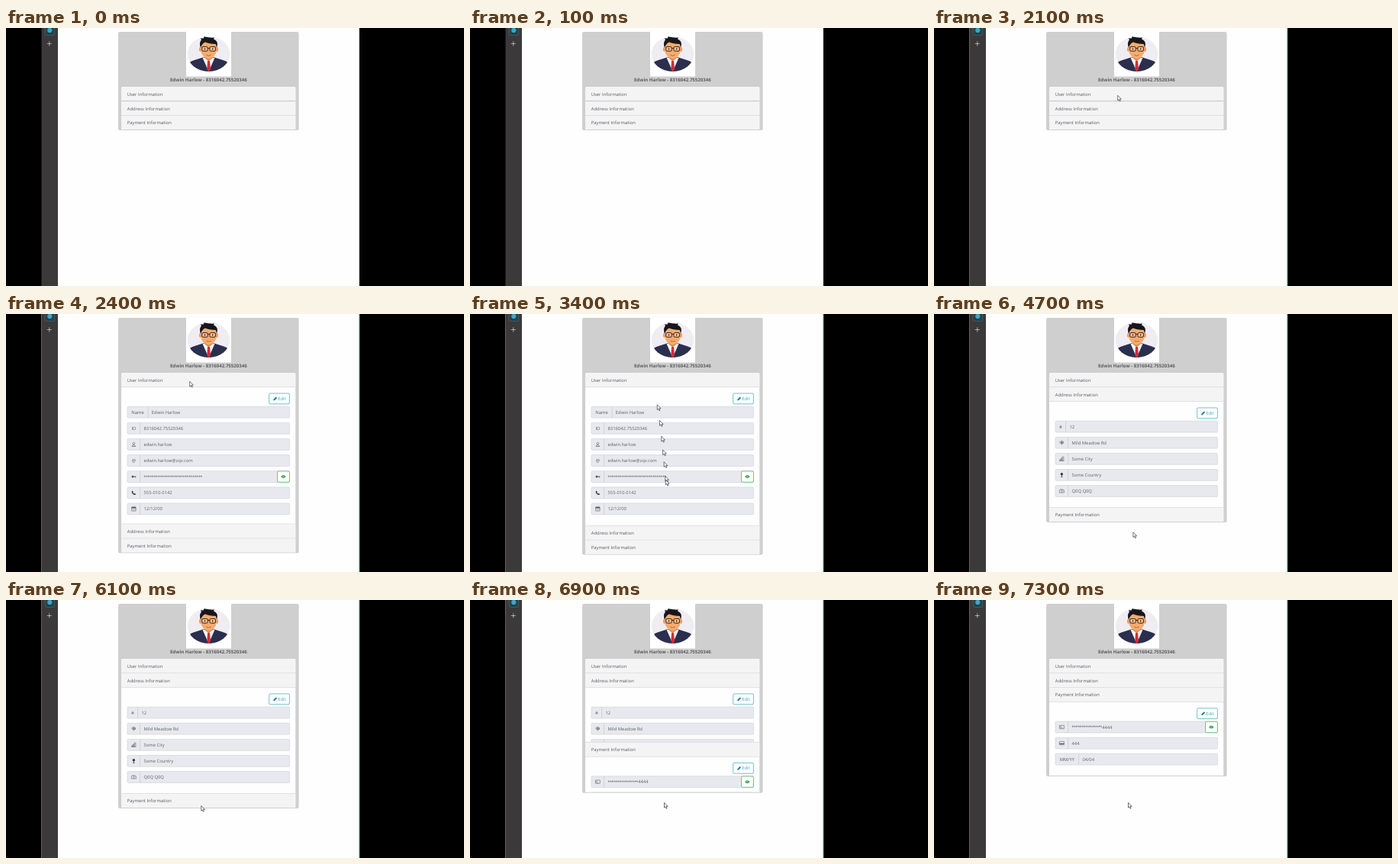
Recreate the animation shown at these times as an HTML page with a canvas. Size 600 px wide and 338 px high, loop 8 s.

```html
<!DOCTYPE html>
<html lang="en">
<head>
<meta charset="utf-8">
<title>Profile accordion</title>
<style>
  html, body { margin: 0; width: 100%; height: 100%; overflow: hidden; background: #000; }
  canvas { display: block; width: 600px; height: 338px; }
</style>
</head>
<body>
<canvas id="stage"></canvas>
<script>
const W = 600, H = 338, LOOP = 8000, STEP = 100;
const canvas = document.getElementById('stage');
const ctx = canvas.getContext('2d');
const dpr = window.devicePixelRatio || 1;
canvas.width = W * dpr;
canvas.height = H * dpr;

const FONT = '"Open Sans", "Noto Sans", sans-serif';
const INK = '#565a5f', ICON = '#4d5258', TEAL = '#2a9db3', GREEN = '#28a745';
const LEFT = 159, RIGHT = 371.5, HEADER = 18.9, TOP = 77;

const PERSON = 'Edwin Harlow', ID = '8316042.75520346';

const sections = [
  { title: 'User Information', height: 181.5, rows: [
    { label: 'Name', split: 186, value: PERSON },
    { label: 'ID', value: ID },
    { icon: 'user', value: 'edwin.harlow' },
    { label: '@', value: 'edwin.harlow@zqv.com' },
    { icon: 'key', stars: 29, value: '', eye: true },
    { icon: 'phone', value: '555-010-0142' },
    { icon: 'calendar', value: '12/12/00' } ] },
  { title: 'Address Information', height: 139, rows: [
    { label: '#', split: 172.7, value: '12' },
    { icon: 'sign', value: 'Mild Meadow Rd' },
    { icon: 'city', value: 'Some City' },
    { icon: 'pin', value: 'Some Country' },
    { icon: 'mailbox', value: 'Q0Q Q0Q' } ] },
  { title: 'Payment Information', height: 97, rows: [
    { icon: 'card', stars: 15, value: '4444', eye: true },
    { icon: 'cardBack', value: '444' },
    { label: 'MM/YY', split: 189.7, value: '04/04' } ] }
];

// Moments when each section starts to open; the previous one closes.
const opens = [2100, 4300, 6800];
const SLIDE = 350;

const clamp = x => Math.max(0, Math.min(1, x));
const lerp = (a, b, u) => a + (b - a) * u;

// cubic-bezier(.25, .1, .25, 1)
function ease(x) {
  if (x <= 0 || x >= 1) return clamp(x);
  let lo = 0, hi = 1;
  const curve = (s, a, b) => 3 * (1 - s) * (1 - s) * s * a + 3 * (1 - s) * s * s * b + s * s * s;
  for (let i = 0; i < 24; i++) {
    const mid = (lo + hi) / 2;
    if (curve(mid, .25, .25) < x) lo = mid; else hi = mid;
  }
  return curve(lo, .1, 1);
}

function openness(i, t) {
  const grown = ease((t - opens[i]) / SLIDE);
  const shrunk = i + 1 < opens.length ? ease((t - opens[i + 1]) / SLIDE) : 0;
  return grown - shrunk;
}

// ---- drawing helpers ----
function rect(x, y, w, h, color) {
  ctx.fillStyle = color;
  ctx.fillRect(x, y, w, h);
}

function box(x, y, w, h, r, fill, stroke, line = .6) {
  ctx.beginPath();
  ctx.roundRect(x, y, w, h, r);
  if (fill) { ctx.fillStyle = fill; ctx.fill(); }
  if (stroke) { ctx.strokeStyle = stroke; ctx.lineWidth = line; ctx.stroke(); }
}

function oval(x, y, rx, ry, fill) {
  ctx.beginPath();
  ctx.ellipse(x, y, rx, ry, 0, 0, Math.PI * 2);
  ctx.fillStyle = fill;
  ctx.fill();
}

function shape(d, fill, stroke, line = .6) {
  const p = new Path2D(d);
  if (fill) { ctx.fillStyle = fill; ctx.fill(p); }
  if (stroke) { ctx.strokeStyle = stroke; ctx.lineWidth = line; ctx.stroke(p); }
}

function text(s, x, y, color = INK, font = '5.85px ' + FONT, align = 'left') {
  ctx.font = font;
  ctx.textAlign = align;
  ctx.fillStyle = color;
  ctx.fillText(s, x, y + 2.1);
  return ctx.measureText(s).width;
}

function at(x, y, draw) {
  ctx.save();
  ctx.translate(x, y);
  draw();
  ctx.restore();
}

// ---- icons, each centred on the origin ----
const icons = {
  user() {
    shape('M-1.3 -1.2a1.3 1.4 0 1 0 2.6 0a1.3 1.4 0 1 0 -2.6 0M-2.4 2.6Q-2.2 .8 0 .8T2.4 2.6Z', null, ICON);
  },
  key() {
    oval(-1.5, 0, 1.4, 1.3, ICON);
    rect(-.5, -.5, 3.5, 1, ICON);
    rect(1.4, 0, .8, 1.2, ICON);
  },
  phone() {
    shape('M-2.6 -2Q-1.5 -3.2 -.8 -1.6Q-.5 -.9 -1.1 -.5Q-.5 .7 .6 1.1Q1 .4 1.8 .9Q3.2 1.8 1.9 2.7C.2 3.3 -3.2 .2 -2.6 -2Z', '#2f3338');
  },
  calendar() {
    box(-2.7, -2.5, 5.4, 5.2, .4, null, ICON);
    rect(-2.7, -2.4, 5.4, 1.5, ICON);
    for (const x of [-1.5, 0, 1.4]) rect(x - .3, .2, .7, .7, ICON);
  },
  sign() {
    shape('M0 -3V3M-2.8 -.6L-1.8 -1.7H2V.3H-1.8ZM-2 .3H1.8L2.8 1', null, ICON);
  },
  city() {
    shape('M-2.7 2.6V1H-1.2V2.6M-1.2 2.6V-.6H.6V2.6M.6 2.6V-2.6H2.5V2.6M-3 2.6H3', null, ICON, .55);
  },
  pin() {
    oval(0, -1.2, 1.7, 1.7, '#35393e');
    rect(-.4, 0, .8, 2.6, '#35393e');
    rect(-1.6, 2.2, 3.2, .6, ICON);
  },
  mailbox() {
    shape('M-3 2V-.4Q-3 -2 -1.6 -2H1.6Q3 -2 3 -.4V2ZM0 2V-.4Q0 -2 -1.5 -2M1 -.3H2.1', null, ICON, .55);
  },
  card() {
    box(-3, -2.2, 6, 4.4, .5, null, ICON, .55);
    rect(-2.1, -1.1, 1.6, 1.3, '#7b8087');
    rect(-2.1, .9, 3.4, .5, '#7b8087');
  },
  cardBack() {
    box(-3, -2.2, 6, 4.4, .5, null, ICON, .55);
    rect(-3, .2, 6, 1.2, ICON);
  }
};

// ---- parts ----
function editButton(y) {
  box(344.7, y - 6.9, 26.7, 13.8, 1.5, '#fff', TEAL, .65);
  at(352.5, y, () => shape('M-2.4 2.6L-1.9 .7L1.2 -2.4L2.6 -1L-.5 2.1Z', '#157f96'));
  text('Edit', 356.2, y, '#3aa5ba');
}

function eyeButton(y) {
  box(355.6, y - 7.2, 15.8, 14.4, 1.3, '#fff', GREEN, .65);
  at(363.3, y, () => {
    shape('M-3.2 0Q0 -4 3.2 0Q0 4 -3.2 0Z', '#2c9a48');
    oval(0, 0, 1.1, 1.1, '#d9f0de');
    oval(0, 0, .6, .6, '#1d7a35');
  });
}

function field(row, y) {
  const split = row.split || 175.7;
  box(LEFT, y - 7.4, RIGHT - LEFT, 14.8, 1.4, '#e8e9ee', '#cbcfd6');
  rect(split - .3, y - 7.4, .7, 14.8, '#c6cad1');
  const mid = (LEFT + split) / 2;
  if (row.icon) at(mid, y, icons[row.icon]);
  else text(row.label, mid, y, INK, undefined, 'center');
  let x = split + 4.8;
  if (row.stars) {
    x += text('*'.repeat(row.stars), x, y + .5, INK, '6.8px "Liberation Sans", sans-serif');
  }
  text(row.value, x, y, '#5d6269');
  if (row.eye) eyeButton(y);
}

function avatar() {
  rect(236, 4.5, 59, 59, '#fff');
  ctx.save();
  ctx.beginPath();
  ctx.ellipse(265.5, 34, 27.8, 23, 0, 0, Math.PI * 2);
  ctx.clip();
  rect(236, 10, 59, 48, '#efedf2');
  shape('M236 58L239 47Q241 43.5 247 42L258 38.5H273L284 42Q290 43.5 292 47L295 58Z', '#2b2f4e');
  shape('M257.5 39L265.5 57L273.5 39Z', '#f6f6fa');
  shape('M264 43H267L268 54L265.7 58L263.3 54Z', '#d8283c');
  ctx.restore();
  shape('M260.5 35H270.5V39.5L265.5 43.5L260.5 39.5Z', '#e2894b');
  oval(254.8, 28, 1.8, 3, '#ee9c5c');
  oval(276.2, 28, 1.8, 3, '#ee9c5c');
  shape('M255.5 18H275.5V31Q274.5 38 265.5 40.5Q256.5 38 255.5 31Z', '#f6ab6c');
  shape('M255 26Q252.5 19 256 15.5L254.8 13.5L259 13.6L259.4 11.2Q266 13 273 12.6L272 14.4Q279 17 276 26L274.8 21Q266 21 261 18.6Q257 20 255 26Z', '#17171c');
  for (const x of [256.8, 267]) box(x, 24.6, 7.4, 5.6, 1.3, '#f9c798', '#2a1c1c', 1);
  rect(264.2, 26, 2.8, .9, '#2a1c1c');
  for (const x of [260.5, 270.7]) oval(x, 27.5, .9, .9, '#2a1c1c');
  shape('M262.5 35.3Q265.5 37 268.5 35.3', null, '#b4562f', .8);
}

function sidebar(active) {
  rect(46.5, 0, 21.2, H, '#3b3939');
  box(51, -3, 12.7, 12.6, 1.5, '#27424c', '#4b6670', .7);
  oval(57.3, 3, 3.1, 3.1, '#35a9cf');
  rect(53.8, 20.1, 6, .8, '#c4c4c4');
  rect(56.4, 17.5, .8, 6, '#c4c4c4');
  if (active) {
    rect(46, 0, 1, H, '#2f7d5b');
    rect(462.6, 0, .9, H, '#43a577');
  }
}

function accordion(t) {
  const heights = sections.map((s, i) => s.height * openness(i, t));
  const bottom = TOP + HEADER * 3 + heights.reduce((a, b) => a + b, 0) - .3;
  box(147, 5, 236.6, bottom - 4.4, 2.2, '#cfcfcf');
  avatar();
  text(PERSON + ' - ' + ID, 265.3, 68.3, '#5b5d61', 'bold 6.1px ' + FONT, 'center');

  ctx.save();
  ctx.beginPath();
  ctx.roundRect(151, TOP, 228.5, bottom - TOP - .4, [1.8, 1.8, 0, 0]);
  ctx.clip();
  rect(151, TOP, 228.5, H, '#fefefe');
  let y = TOP;
  sections.forEach((s, i) => {
    rect(151, y, 228.5, HEADER, '#f5f4f5');
    if (i) rect(151, y - .6, 228.5, .8, '#dcdcdd');
    text(s.title, 158.8, y + 9.5);
    y += HEADER;
    const h = heights[i];
    if (h > .1) {
      ctx.save();
      ctx.beginPath();
      ctx.rect(151, y, 228.5, h);
      ctx.clip();
      editButton(y + 15);
      s.rows.forEach((row, k) => field(row, y + 32.8 + 21.1 * k));
      ctx.restore();
      rect(151, y - .6, 228.5, .8, '#dcdcdd');
    }
    y += h;
  });
  if (t <= opens[0]) rect(151, 95.2, 228.5, 1, '#c9c9cb');
  ctx.restore();
}

// ---- pointer: [time, x, y] ----
const path = [
  [3100, 240.4, 88], [3200, 241, 94], [3300, 245, 118.5], [3400, 256, 217],
  [3500, 258, 250], [3600, 259.2, 269], [3700, 260, 279], [3800, 260.4, 284], [3900, 260.6, 285.5]
];
const TRAIL = [0, .21, .42, .6, .76, .95];

function pointerAt(t) {
  if (t >= 5600) {
    const u = clamp((t - 5600) / 700), s = u * u * (3 - 2 * u);
    return [lerp(260.6, 254.2, s), lerp(285.5, 265.2, s)];
  }
  let spot = path[0];
  for (const p of path) if (p[0] <= t) spot = p;
  return spot.slice(1);
}

function arrow(x, y) {
  at(x, y, () => shape('M.3 .3V7L1.8 5.6L2.9 8.1L4 7.6L2.9 5.2H5Z', '#fff', '#3c3c40', .7));
}

function pointer(t) {
  if (t < 2100) return;
  const [x, y] = pointerAt(t);
  const [px, py] = pointerAt(t - STEP);
  if (t < 3600 && y - py > 20) {
    for (const u of TRAIL) arrow(lerp(px, x, Math.pow(u, .8)), lerp(py, y, u));
  }
  arrow(x, y);
}

function draw(t) {
  ctx.setTransform(dpr, 0, 0, dpr, 0, 0);
  ctx.textRendering = 'geometricPrecision';
  ctx.textBaseline = 'alphabetic';
  rect(0, 0, W, H, '#000');
  rect(67.7, 0, 395.2, H, '#fefefe');
  sidebar(t >= 2100);
  accordion(t);
  pointer(t);
}

const start = performance.now();
function tick() {
  const t = (performance.now() - start) % LOOP;
  draw(Math.floor(t / STEP) * STEP);
  requestAnimationFrame(tick);
}
tick();
</script>
</body>
</html>
```
